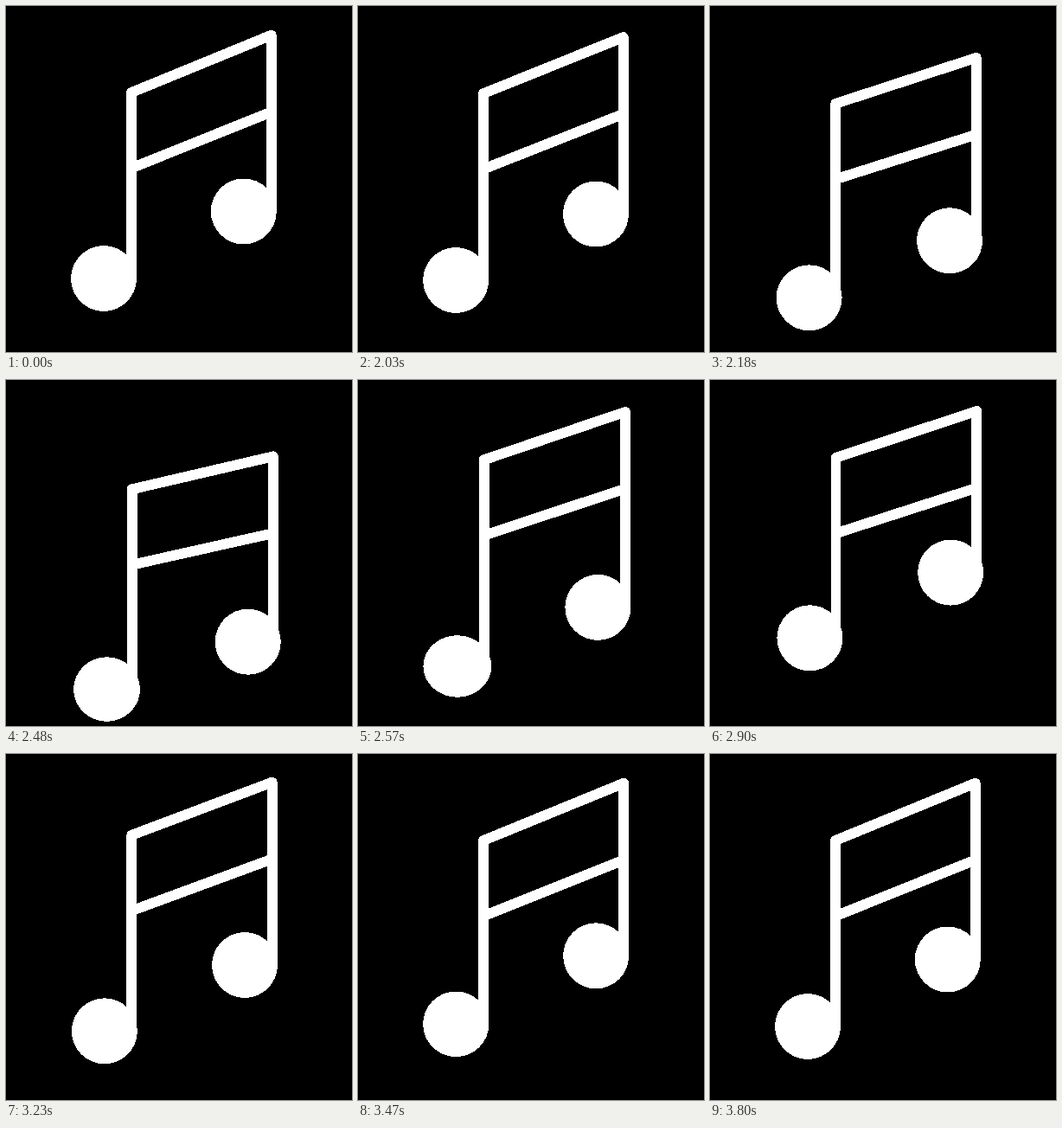
Recreate the animation shown at these times as an HTML page. Size 400x400 px, loop 3.83 s.

```html
<!DOCTYPE html>
<html lang="en">
<head>
<meta charset="utf-8">
<title>Bouncing note</title>
<style>
  html, body { margin: 0; height: 100%; overflow: hidden; background: #000; }
  svg { display: block; width: 100vw; height: 100vh; }
  path { fill: none; stroke: #fff; stroke-width: 11.8; stroke-linecap: round; stroke-linejoin: round; }
  ellipse { fill: #fff; }
</style>
</head>
<body>
<svg viewBox="0 0 400 400" shape-rendering="crispEdges">
  <path id="frame"/>
  <ellipse id="left"/>
  <ellipse id="right"/>
</svg>
<script>
// Times in ms: rest until START, crouch, then spring back until END
const LOOP = 3830, START = 2000, END = 3800, STEP = 30;
const BEAM_LAUNCH = 2470, HEAD_LAUNCH = 2450, HOP = 1000;

const { PI, sin, cos, min, max, floor } = Math;
const $ = id => document.getElementById(id);

const since = (t, launch) => max(0, t - launch);
const crouch = (t, launch) => sin(PI / 2 * min(1, (t - START) / (launch - START))) ** 1.4;
const fade = (t, launch) => 1 - since(t, launch) / (END - launch);
const swing = (t, launch, half) => cos(PI * since(t, launch) / half);

// Lift that rises fast and sinks slowly, with a peak of 1
function lift(t, launch) {
  const u = min(1, since(t, launch) / HOP);
  return 27 / 4 * u * (1 - u) ** 2;
}

// Crouch by depth, then a damped swing plus a hop
const bounce = (t, { launch, depth, half, damping, hop }) =>
  depth * crouch(t, launch) * swing(t, launch, half) * fade(t, launch) ** damping
  - hop * lift(t, launch);

const topLeft = { launch: BEAM_LAUNCH, depth: 28.5, half: 220, damping: 3, hop: 20 };
const topRight = { launch: BEAM_LAUNCH, depth: 58, half: 220, damping: 6, hop: 3.5 };
const headLeft = { launch: HEAD_LAUNCH, depth: 47, half: 350, damping: 2, hop: 4 };
const headRight = { launch: HEAD_LAUNCH, depth: 71, half: 335, damping: 2, hop: 0 };

function setHead(id, cx, cy, squash) {
  const attrs = { cx, cy, rx: 38 + squash * 0.7, ry: 38 - squash * 1.1 };
  for (const name in attrs) $(id).setAttribute(name, attrs[name]);
}

function draw(now) {
  const t = START + STEP * max(0, floor((now % LOOP - START) / STEP));
  const lean = crouch(t, BEAM_LAUNCH) * fade(t, BEAM_LAUNCH);
  const sway = lean * (1 + swing(t, BEAM_LAUNCH, 215));
  const squash = 3 * max(0, sin(PI * since(t, HEAD_LAUNCH) / 400)) * fade(t, HEAD_LAUNCH) ** 2;

  const x1 = 145 + lean * 0.8, x2 = 306.7 + lean * 2.3;
  const top1 = 100 + bounce(t, topLeft), top2 = 33.7 + bounce(t, topRight);
  const y1 = 315 + bounce(t, headLeft), y2 = 237.5 + bounce(t, headRight);

  $("frame").setAttribute("d",
    `M${x1} ${y1}V${top1}L${x2} ${top2}V${y2}M${x1} ${top1 + 87.4}L${x2} ${top2 + 88.8}`);
  setHead("left", 113 + sway * 1.8, y1, squash);
  setHead("right", 274.8 + sway * 2.5, y2, 0);
}

const origin = performance.now();
function tick() {
  draw(performance.now() - origin);
  requestAnimationFrame(tick);
}
tick();
</script>
</body>
</html>
```
